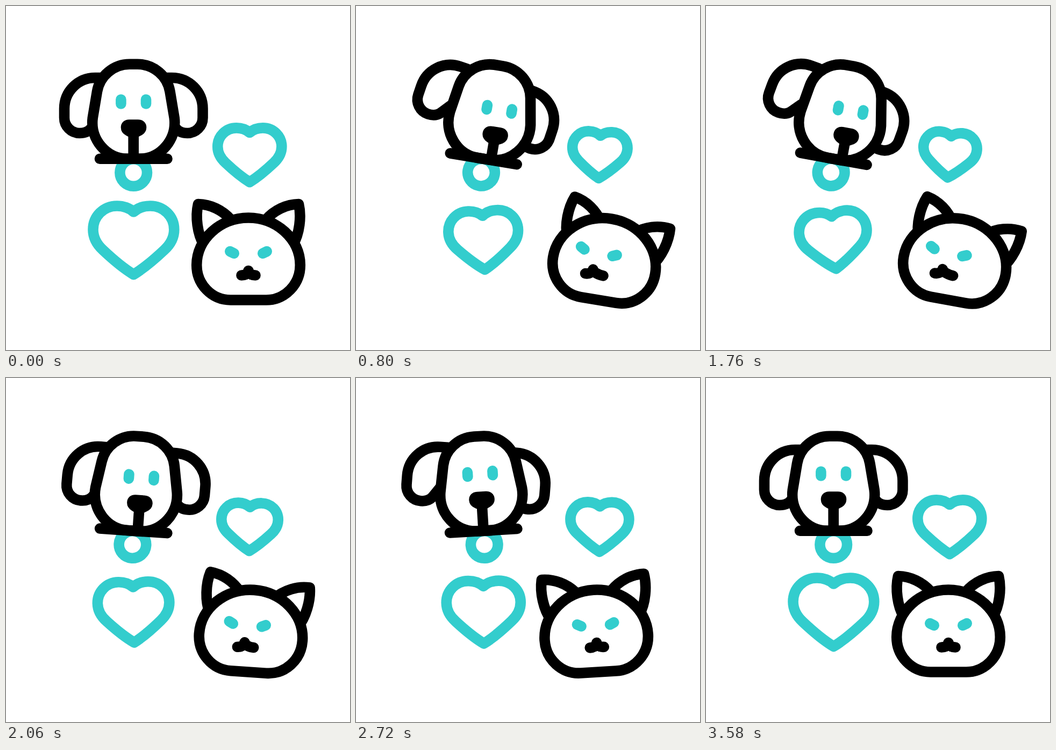
An HTML page that plays this animation: 640x640 px, repeating every 3.6 s.

```html
<!DOCTYPE html>
<html lang="en">
<head>
<meta charset="utf-8">
<title>Dog and cat</title>
<style>
  html, body { margin: 0; width: 100%; height: 100%; overflow: hidden; background: #fff; }
  svg { display: block; width: 100vw; height: 100vh; }
  .line { fill: none; stroke: #000; stroke-width: 19.6; stroke-linecap: round; stroke-linejoin: round; }
  .face { fill: #fff; }
  .solid { fill: #000; }
  .teal { stroke: #33cdcd; }
</style>
</head>
<body>
<svg viewBox="0 0 640 640">
  <defs>
    <path id="heart" d="M0 -52C-8 -59 -19 -63 -31 -63C-56 -63 -75.4 -43.5 -75.4 -19C-75.4 -4 -69 8 -57 19C-39 36 -19 53 0 64.5C19 53 39 36 57 19C69 8 75.4 -4 75.4 -19C75.4 -43.5 56 -63 31 -63C19 -63 8 -59 0 -52Z"/>
    <path id="dogEar" d="M180 133.5H166C134 133.5 108.5 159 108.5 191V208A28.5 28.5 0 0 0 137 236.5C146 236.5 153 234 158 228L172 208"/>
    <path id="catEar" d="M368 444C356 424 352 392 357.5 368.5C381 369 403 380 418 397"/>
  </defs>

  <use id="bigHeart" class="line teal" href="#heart"/>
  <use id="smallHeart" class="line teal" href="#heart"/>

  <g id="dog" class="line">
    <circle class="teal" cx="237.2" cy="310" r="25.3"/>
    <g id="dogEars">
      <use href="#dogEar"/>
      <use href="#dogEar" transform="matrix(-1 0 0 1 474.5 0)"/>
    </g>
    <path class="face" d="M230 108.3H244.5C275 108.3 300 130 305 159L313.2 208C318.5 248 287.5 284.3 248.5 284.3H226C187 284.3 156 248 161.3 208L169.5 159C174.5 130 200 108.3 230 108.3Z"/>
    <g id="dogFace">
      <path class="teal" d="M213.9 174V182M260.5 174V182"/>
      <path class="solid" d="M229 221H245.5Q251.5 221 251.5 226Q251.5 230 246 232.5L237.2 237L228.5 232.5Q223.5 230 223.5 226Q223.5 221 229 221Z"/>
      <path d="M237.2 235V278" stroke-linecap="butt"/>
    </g>
    <path d="M174.5 284.3H300"/>
  </g>

  <g id="cat" class="line">
    <g id="catEars">
      <use id="leftEar" href="#catEar"/>
      <g transform="matrix(-1 0 0 1 902 0)"><use id="rightEar" href="#catEar"/></g>
    </g>
    <path class="face" d="M418 547C383 547 354.7 518 354.7 482C354.7 434 398 394 451 394C504 394 547.3 434 547.3 482C547.3 518 519 547 484 547Z"/>
    <path id="catEyes" class="teal" d="M416.8 456.6L424.2 460.2M485.2 456.6L477.8 460.2"/>
    <path id="mouth"/>
  </g>
</svg>
<script>
const LOOP = 3600;
const el = {};
document.querySelectorAll("svg [id]").forEach(n => el[n.id] = n);

const smooth = u => (1 - Math.cos(Math.PI * u)) / 2;

// Quick start with a long soft settle, as a cubic Bezier curve
function settle(u) {
  const x1 = 0.17, x2 = 0.2;
  let lo = 0, hi = 1;
  for (let i = 0; i < 24; i++) {
    const s = (lo + hi) / 2, r = 1 - s;
    if (3 * x1 * s * r * r + 3 * x2 * s * s * r + s * s * s < u) lo = s; else hi = s;
  }
  return lo * lo * (3 - 2 * lo);
}

// Keys are [time, value, easing into this key]
function track(t, keys) {
  let [t0, v0] = keys[0];
  for (const [t1, v1, ease = smooth] of keys.slice(1)) {
    if (t <= t1) return v0 + (v1 - v0) * ease((t - t0) / (t1 - t0));
    t0 = t1;
    v0 = v1;
  }
  return v0;
}

const lean = top => [[0, 0], [1350, top, settle], [1680, top]];
const tilt = [...lean(10.6), [2550, -6], [3000, 2.2], [3330, -0.9], [LOOP, 0]];
const flop = [...lean(10.4), [2440, -8.3], [2725, 7.8], [3000, -5.5], [3285, 2.8], [LOOP, 0]];
const look = [...lean(1), [2440, 0]];
const perk = [[0, 0], [2440, 0], [3000, 3.6], [3330, 0]];
const sway = [[0, 0], [600, -5], [1200, 5], [1800, -5], [2400, 5], [3000, -5], [LOOP, 0]];
const beat = [[0, 1], [645, 0.829], [1200, 1]];

const set = (node, value) => node.setAttribute("transform", value);
const spin = (node, a, x, y) => set(node, `rotate(${a} ${x} ${y})`);

function placeHeart(node, x, y, a, size) {
  set(node, `translate(${x} ${y}) rotate(${a}) scale(${size})`);
  node.style.strokeWidth = 19.6 / size;
}

function draw(t) {
  const head = track(t, tilt), k = track(t, look);
  const a = track(t, sway), size = track(t % 1200, beat);

  placeHeart(el.bigHeart, 237.4, 435, a, size);
  placeHeart(el.smallHeart, 453.3, 276.6, -a, size * 0.79);

  spin(el.dog, head, 237.2, 284.3);
  spin(el.dogEars, track(t, flop), 237.2, 132);
  set(el.dogFace, `translate(${15.8 * k} ${12 * k})`);

  spin(el.cat, head, 451, 547);
  spin(el.catEars, 10.2 * k, 390, 485);
  for (const ear of [el.leftEar, el.rightEar]) spin(ear, -track(t, perk), 390, 425);
  set(el.catEyes, `translate(${-16 * k} 0) rotate(${4.4 * k} 451 458.5)`);
  const x = 451 - 21.5 * k, r = 464 - 13 * k, y = 501 + 1.5 * k;
  el.mouth.setAttribute("d",
    `M${x - 13} ${y}C${x - 5} ${y} ${x} 497 ${x} 492.5C${x} 497 ${r - 8} 501 ${r} 501`);
}

function tick(now) {
  draw(now % LOOP);
  requestAnimationFrame(tick);
}
draw(0);
requestAnimationFrame(tick);
</script>
</body>
</html>
```
